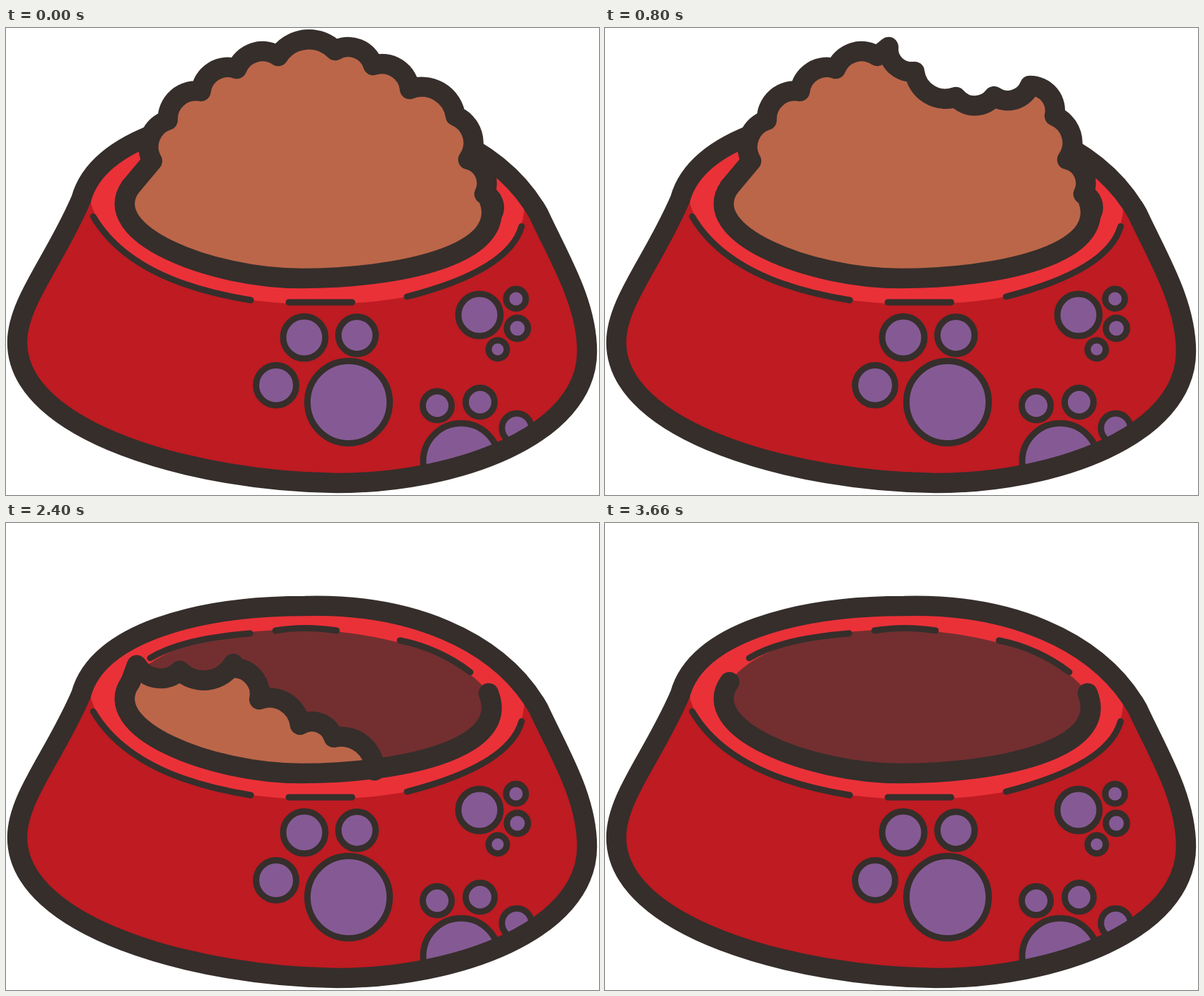
Animation, 843 px wide and 664 px high, one loop 4 s. Source, as an HTML page:

```html
<!DOCTYPE html>
<html lang="en">
<head>
<meta charset="utf-8">
<title>Pet bowl</title>
<style>
  html, body { margin: 0; width: 100%; height: 100%; overflow: hidden; background: #fff; }
  svg { display: block; width: 843px; height: 664px; }
  .ink { fill: none; stroke: #352e2b; stroke-width: 28.5; stroke-linecap: round; stroke-linejoin: round; }
  .thin { stroke-width: 9; }
  .paw { fill: #855a94; }
  .food { opacity: 0; animation: 4s step-end infinite; }
  .food .fill { fill: #bb6649; }
  #full { animation-name: full; }
  #bitten { animation-name: bitten; }
  #half { animation-name: half; }
  #scraps { animation-name: scraps; }
  @keyframes full { 0% { opacity: 1 } 20%, 100% { opacity: 0 } }
  @keyframes bitten { 0% { opacity: 0 } 20% { opacity: 1 } 40%, 100% { opacity: 0 } }
  @keyframes half { 0% { opacity: 0 } 40% { opacity: 1 } 60%, 100% { opacity: 0 } }
  @keyframes scraps { 0% { opacity: 0 } 60% { opacity: 1 } 79%, 100% { opacity: 0 } }
</style>
</head>
<body>
<svg viewBox="0 0 843 664">
  <defs>
    <path id="bowl" d="M16 447C16 390 70 330 107 243C130 158 270 118 425 118C570 114 700 164 757 264
      C785 325 826 390 826 460C826 580 640 647 470 647C270 645 16 575 16 447Z"/>
    <path id="front" d="M177 226C130 292 290 356 420 356S720 325 686 242"/>
    <clipPath id="inBowl"><use href="#bowl"/></clipPath>
    <clipPath id="inBasin"><path d="M177 226C130 292 290 356 420 356S720 325 686 242V0H177Z"/></clipPath>
  </defs>

  <use href="#bowl" fill="#be1b22"/>
  <g clip-path="url(#inBowl)">
    <path fill="#ea3138" d="M121 250C150 345 290 393 440 393S737 355 737 250V0H121Z"/>
    <path fill="#732f30" d="M177 226C130 292 290 356 420 356S720 325 686 242C610 132 255 118 177 226Z"/>
    <g class="ink thin paw">
      <circle cx="487" cy="532" r="58.5"/>
      <circle cx="384" cy="508" r="28.5"/>
      <circle cx="424" cy="440" r="30"/>
      <circle cx="499" cy="437" r="26.5"/>

      <circle cx="673" cy="408" r="30"/>
      <circle cx="725" cy="385" r="14"/>
      <circle cx="727" cy="427" r="15"/>
      <circle cx="699" cy="457" r="13"/>

      <circle cx="647" cy="616" r="54"/>
      <circle cx="613" cy="537" r="20.5"/>
      <circle cx="674" cy="532" r="20.5"/>
      <circle cx="726" cy="569" r="21"/>
    </g>
  </g>
  <use href="#bowl" class="ink"/>
  <path class="ink thin" d="M205 192Q248 165 347 157M383 153Q425 146 470 153M560 167Q615 178 660 212
    M124 268Q178 360 348 387M402 390H492M570 382Q715 345 733 282"/>
  <g id="foods"></g>
  <use href="#front" class="ink"/>
</svg>
<script>
function add(parent, tag, attrs) {
  const el = document.createElementNS('http://www.w3.org/2000/svg', tag);
  for (const k in attrs) el.setAttribute(k, attrs[k]);
  return parent.appendChild(el);
}

// One arc between each pair of corners
const scallop = (sweep, corners) => corners.map((p, i) => {
  if (!i) return 'L' + p;
  const q = corners[i - 1];
  const r = 0.64 * Math.hypot(p[0] - q[0], p[1] - q[1]);
  return `A${r} ${r} 0 0 ${sweep} ${p}`;
}).join('');
const bumps = (...corners) => scallop(1, corners);
const bites = (...corners) => scallop(0, corners);

const left = [[208, 189], [230, 131], [277, 90], [328, 58], [387, 40]];
const crown = [[468, 32], [522, 53], [574, 87]];
const right = [[639, 125], [657, 187], [680, 236], [691, 265]];
const low = [[186, 202], [247, 210], [323, 200]];
const gap = [[499, 98], [553, 97], [604, 82]];
const tip = gap[2];

const tops = {
  full: bumps(...left, ...crown, ...right),
  bitten: bumps(...left) + bites([403, 27], [440, 62], ...gap) + bumps(tip, ...right),
  half: bites(...low, [396, 144], [452, 115], ...gap) + bumps(tip, ...right),
  scraps: bites(...low) + bumps([323, 206], [360, 251], [418, 287], [466, 305], [524, 352])
};

for (const id in tops) {
  const d = 'M177 226' + tops[id];
  const g = add(document.getElementById('foods'), 'g', { id, class: 'food' });
  add(g, 'path', { class: 'fill', d: d + 'V400H177Z', 'clip-path': 'url(#inBasin)' });
  add(g, 'path', { class: 'ink', d });
}
</script>
</body>
</html>
```
